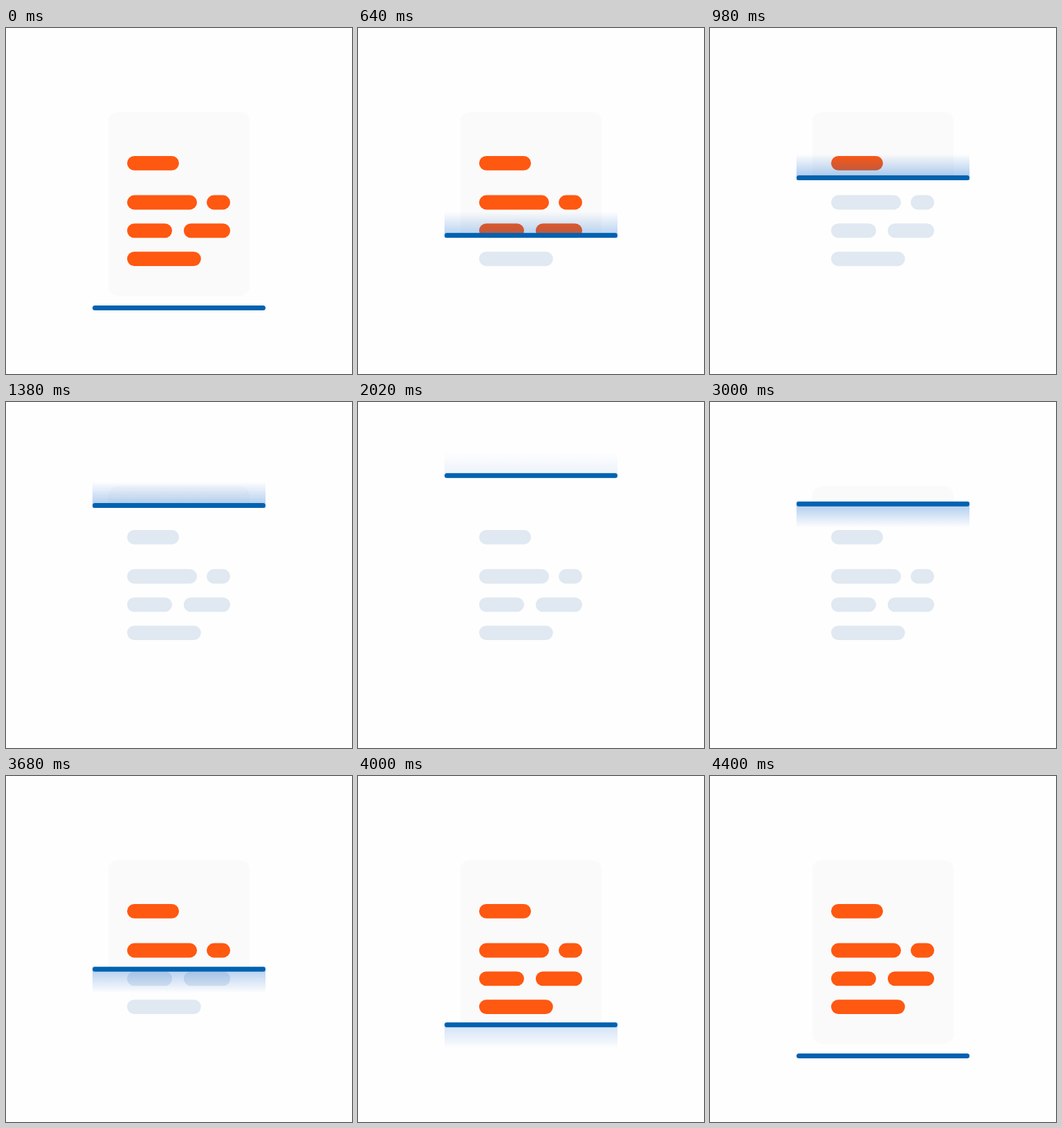
Write an HTML page that moves like this. It is 500 px wide and 500 px high and loops after 4560 ms.

```html
<!DOCTYPE html>
<html lang="en">
<head>
<meta charset="utf-8">
<title>Document scan</title>
<style>
  :root {
    --loop: 4560ms;
    --tint: rgba(0, 98, 205, .38);
    --clear: rgba(0, 98, 205, 0);
  }
  html, body {
    margin: 0;
    width: 100%;
    height: 100%;
    overflow: hidden;
    background: #fefefe;
  }
  svg {
    position: absolute;
    left: 0;
    top: 0;
    width: 500px;
    height: 500px;
  }
  .blank { fill: #e0e8f1; }
  .inked { fill: #ff5811; }
  .page { animation: reveal var(--loop) infinite; }
  .beam {
    position: absolute;
    left: 125px;
    top: 400.8px;
    width: 250px;
    height: 7.6px;
    animation: travel var(--loop) infinite;
  }
  .bar {
    position: absolute;
    inset: 0;
    border-radius: 3.8px;
    background: #0062b0;
  }
  .glow {
    position: absolute;
    left: 0;
    width: 100%;
    height: 38px;
    opacity: 0;
  }
  .above {
    bottom: 0;
    background: linear-gradient(to top, var(--tint), var(--clear));
    animation: glow-up var(--loop) infinite;
  }
  .below {
    top: 0;
    background: linear-gradient(to bottom, var(--tint), var(--clear));
    animation: glow-down var(--loop) infinite;
  }

  /* 2200 ms up, 2200 ms down, 160 ms rest */
  @keyframes travel {
    0% { transform: translateY(0); animation-timing-function: cubic-bezier(.276, 0, .38, 1); }
    48.2456% { transform: translateY(-300px); animation-timing-function: cubic-bezier(.62, 0, .724, 1); }
    96.4912%, 100% { transform: translateY(0); }
  }
  @keyframes reveal {
    0% { clip-path: inset(0 0 95.4px 0); animation-timing-function: cubic-bezier(.276, 0, .38, 1); }
    48.2456% { clip-path: inset(0 0 395.4px 0); animation-timing-function: cubic-bezier(.62, 0, .724, 1); }
    96.4912%, 100% { clip-path: inset(0 0 95.4px 0); }
  }
  /* half a sine wave each */
  @keyframes glow-up {
    0% { opacity: 0; animation-timing-function: cubic-bezier(.39, .575, .565, 1); }
    24.1228% { opacity: 1; animation-timing-function: cubic-bezier(.47, 0, .745, .715); }
    48.2456%, 100% { opacity: 0; }
  }
  @keyframes glow-down {
    0%, 48.2456% { opacity: 0; animation-timing-function: cubic-bezier(.39, .575, .565, 1); }
    72.3684% { opacity: 1; animation-timing-function: cubic-bezier(.47, 0, .745, .715); }
    96.4912%, 100% { opacity: 0; }
  }
</style>
</head>
<body>
<svg viewBox="0 0 500 500">
  <defs>
    <g id="lines">
      <rect x="175" y="185" width="75" height="20.8" rx="10.4"/>
      <rect x="175" y="241.6" width="101" height="20.8" rx="10.4"/>
      <rect x="290" y="241.6" width="34" height="20.8" rx="10.4"/>
      <rect x="175" y="282.4" width="65" height="20.8" rx="10.4"/>
      <rect x="256.8" y="282.4" width="67.2" height="20.8" rx="10.4"/>
      <rect x="175" y="323.2" width="106.8" height="20.8" rx="10.4"/>
    </g>
  </defs>
  <use href="#lines" class="blank"/>
</svg>
<svg class="page" viewBox="0 0 500 500">
  <rect x="148" y="121.5" width="204" height="265.5" rx="14" fill="#fafafa"/>
  <use href="#lines" class="inked"/>
</svg>
<div class="beam">
  <div class="glow above"></div>
  <div class="glow below"></div>
  <div class="bar"></div>
</div>
</body>
</html>
```
